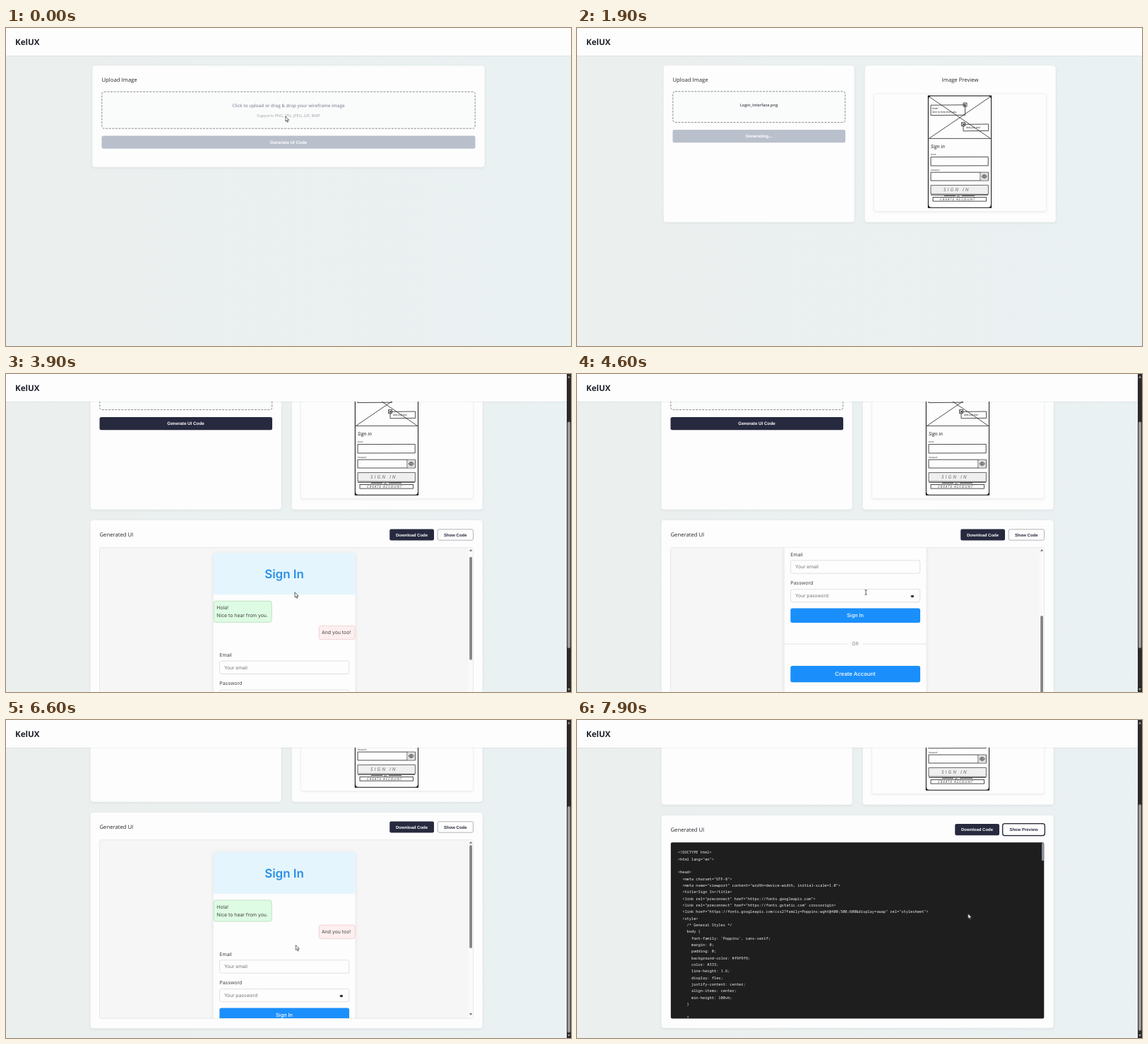
An HTML page that plays this animation: 800x450 px, repeating every 8 s.

```html
<!DOCTYPE html>
<html lang="en">
<head>
<meta charset="utf-8">
<title>KelUX</title>
<style>
@property --page { syntax: '<number>'; inherits: true; initial-value: 0; }
@property --panel { syntax: '<number>'; inherits: true; initial-value: 0; }

html, body { margin: 0; height: 100%; overflow: hidden; background: #ebf0f0; }
svg { display: block; }
#stage {
  width: 100vw; height: 100vh;
  animation: page-scroll 8s ease-in-out infinite, panel-scroll 8s ease-in-out infinite;
}
text { font-family: 'Open Sans', 'Noto Sans', sans-serif; text-rendering: geometricPrecision; fill: #25272e; }
.mid { text-anchor: middle; }
.brand { font-size: 11.6px; font-weight: 700; fill: #20222b; }
.head { font-size: 7.7px; font-weight: 500; }
.btn { font: 700 6.25px 'Liberation Sans', Arial, sans-serif; text-anchor: middle; fill: #fff; }
.small { font-size: 5.97px; }
.pop, .pop text { font-family: Inter, 'Open Sans', sans-serif; }
.label { font-size: 6.9px; fill: #444; }
.hint { font: 6.67px 'Liberation Sans', Arial, sans-serif; fill: #757575; }
.card { fill: #fdfdfd; stroke: #e4e8e9; stroke-width: .6; filter: drop-shadow(0 1px 1.5px rgba(0,0,0,.06)); }
.drop { fill: #fafbfb; stroke: #83868f; stroke-width: .95; stroke-dasharray: 3 1.6; }
.dark { fill: #272a3f; }
.grey { fill: #b9c0cb; }
.field { fill: #fdfdfd; stroke: #dadada; stroke-width: .8; }
.blue { fill: #1a8ffb; }
.rule { stroke: #dcdcdc; stroke-width: .8; }
.ink { fill: none; stroke: #222; stroke-width: .8; }
.hand-text text { font-style: italic; fill: #111; font-size: 3.6px; }
pre {
  margin: 0; color: #f2f2f2; white-space: pre;
  font: 5.33px/9.33px 'Noto Sans Mono', 'DejaVu Sans Mono', monospace;
}

#page { transform: translateY(calc(var(--page) * -1px)); }
#form { transform: translateY(calc(var(--panel) * -1px)); }
#page-thumb { transform: translateY(calc(var(--page) * .717px)); }
#panel-thumb { transform: translateY(calc(var(--panel) * .585px)); }

@keyframes page-scroll {
  0%, 42.5% { --page: 0; }
  47.5%, 57.6% { --page: 83; }
  61.2%, 83% { --page: 159; }
  90%, 94.4% { --page: 34; }
  98.6%, 100% { --page: 155; }
}
@keyframes panel-scroll {
  0%, 48% { --panel: 0; }
  51.2%, 53% { --panel: 83; }
  56.4%, 71.25% { --panel: 152; animation-timing-function: linear; }
  72.5% { --panel: 131; animation-timing-function: ease-out; }
  82.5%, 100% { --panel: 0; }
}

.start, .pair, .result, .busy, .ready, .preview, .code, .hover, .arrow, .hand, .beam {
  animation: 8s step-end infinite;
}
.start { animation-name: start; }
.pair { animation-name: pair; }
.result { animation-name: result; }
.busy { animation-name: busy; }
.ready { animation-name: ready; }
.preview { animation-name: preview; }
.code { animation-name: code; }
.hover { animation-name: hover; }
.arrow { animation-name: arrow; }
.hand { animation-name: hand; }
.beam { animation-name: beam; }
.shift { animation: shift 8s step-end infinite; }
.run { animation: run 8s linear infinite; }
#cursor { animation: move 8s ease-in-out infinite; }

@keyframes start { 0% { opacity: 1; } 3.7%, 100% { opacity: 0; } }
@keyframes pair { 0% { opacity: 0; } 3.7%, 100% { opacity: 1; } }
@keyframes result { 0% { opacity: 0; } 32.4%, 100% { opacity: 1; } }
@keyframes busy { 0% { opacity: 0; } 12.4% { opacity: 1; } 32.4%, 100% { opacity: 0; } }
@keyframes ready { 0% { opacity: 1; } 12.4% { opacity: 0; } 32.4%, 100% { opacity: 1; } }
@keyframes preview { 0% { opacity: 1; } 93.7%, 100% { opacity: 0; } }
@keyframes code { 0% { opacity: 0; } 93.7%, 100% { opacity: 1; } }
@keyframes hover { 0% { opacity: 0; } 90%, 100% { opacity: 1; } }
@keyframes shift { 0% { transform: translateX(3px); } 32.4%, 100% { transform: none; } }
@keyframes run {
  0%, 3.7% { fill: #b9c0cb; }
  6.25%, 12.4% { fill: #272a3f; }
  15%, 32.4% { fill: #b9c0cb; }
  35%, 100% { fill: #272a3f; }
}
@keyframes move {
  0%, 3.75% { transform: translate(395.5px, 125px); }
  10%, 13.1% { transform: translate(272px, 151px); }
  17.5%, 30% { transform: translate(6px, 263px); }
  37.4% { transform: translate(60px, 262px); }
  41.25%, 42.5% { transform: translate(416.3px, 257px); }
  47.5%, 63.8% { transform: translate(409px, 309px); }
  66.25%, 86% { transform: translate(410.3px, 318.5px); }
  90.5%, 94.3% { transform: translate(648px, 278px); }
  97.5%, 100% { transform: translate(553.6px, 274px); }
}
@keyframes arrow {
  0% { opacity: 1; } 8.75% { opacity: 0; } 13.1% { opacity: 1; } 23.7% { opacity: 0; }
  37.4% { opacity: 1; } 55.6% { opacity: 0; } 58.7% { opacity: 1; }
  90% { opacity: 0; } 94.4%, 100% { opacity: 1; }
}
@keyframes hand {
  0% { opacity: 0; } 8.75% { opacity: 1; } 13.1% { opacity: 0; }
  90% { opacity: 1; } 94.4%, 100% { opacity: 0; }
}
@keyframes beam { 0% { opacity: 0; } 55.6% { opacity: 1; } 58.7%, 100% { opacity: 0; } }
</style>
</head>
<body>
<svg id="stage" viewBox="0 0 800 450">
  <defs>
    <linearGradient id="bg"><stop stop-color="#ebefee"/><stop offset="1" stop-color="#eaf1f2"/></linearGradient>
    <clipPath id="panel-clip"><rect x="132.8" y="329" width="528.4" height="252" rx="2"/></clipPath>
  </defs>
  <rect width="800" height="450" fill="url(#bg)"/>

  <g id="page">
    <g class="start">
      <rect class="card" x="122" y="53" width="556" height="144" rx="4"/>
      <text class="head" x="135.5" y="76.2">Upload Image</text>
      <rect class="drop" x="135.8" y="90.2" width="528.4" height="52" rx="3"/>
      <text class="mid" x="400" y="111.6" style="font-size:6.3px;font-weight:600;fill:#8e91a2">Click to upload or drag &amp; drop your wireframe image</text>
      <text class="mid" x="400" y="125.5" style="font-size:5.6px;fill:#a0a2aa">Supports PNG, JPG, JPEG, GIF, BMP</text>
      <rect class="grey" x="135.5" y="152.5" width="529" height="18.3" rx="2.5"/>
      <text class="btn" x="400" y="164">Generate UI Code</text>
    </g>

    <g class="pair"><g class="shift">
      <rect class="card" x="119.3" y="52.8" width="270.7" height="222.2" rx="4"/>
      <text class="head" x="132.5" y="76">Upload Image</text>
      <rect class="drop" x="132.8" y="89.8" width="243.9" height="43.8" rx="3"/>
      <text class="mid" x="254.5" y="110.6" style="font-size:5.65px;font-weight:600;fill:#454750">Login_Interface.png</text>
      <rect class="run" x="132.5" y="144" width="244.5" height="18.2" rx="2.5"/>
      <text class="btn ready" x="254.5" y="155.2">Generate UI Code</text>
      <text class="btn busy" x="254.5" y="155.4">Generating...</text>

      <rect class="card" x="404.3" y="52.8" width="270.7" height="222.2" rx="4"/>
      <text class="head mid" x="539.5" y="76">Image Preview</text>
      <rect class="card" x="417.6" y="93" width="244" height="166.5" rx="2.5"/>

      <g class="hand-text">
        <rect x="493.8" y="95.5" width="90.2" height="159.2" fill="#000"/>
        <rect x="494.8" y="96.5" width="88.3" height="157.3" rx="4" fill="#fdfdfd"/>
        <path class="ink" d="M495 156.4H583M496 97.5L582 156M582 97.5L496 156"/>
        <path class="ink" d="M498 109.2L546.5 108.8V123.2L498 123.6ZM544 106h5v5.2h-5zM545 107l3 3m0-3l-3 3"/>
        <path class="ink" d="M544 136.4L579.6 136V145.4L544 145.8ZM541.5 133.6h5v5.2h-5zM542.5 134.6l3 3m0-3l-3 3"/>
        <text x="500" y="114.8">Hola!</text>
        <text x="500" y="120">Nice to hear from you.</text>
        <text x="548" y="142">And you too!</text>
        <text x="498" y="169.8" style="font-size:6.8px;font-weight:500">Sign in</text>
        <text x="498" y="180.3" style="font-size:2.9px">Email</text>
        <text x="498" y="201.6" style="font-size:2.9px">Password</text>
        <path class="ink" d="M498 182.6L579.2 182.4V194.8L498 195ZM498 204.2H579.4V216H498ZM568 204.2V216"/>
        <rect x="568.5" y="204.7" width="10.4" height="10.8" fill="#ddd"/>
        <path class="ink" stroke-width=".6" d="M570 210q3.6-4.6 7.4 0q-3.6 4.6-7.4 0"/>
        <circle class="ink" cx="573.7" cy="210" r="1.3"/>
        <path d="M498 222.6L579.4 222.4V235.4L498 235Z" fill="#efefef" stroke="#444" stroke-width=".8"/>
        <text x="516" y="231" style="font-size:6.8px;letter-spacing:2.1px;fill:#666">SIGN IN</text>
        <path class="ink" stroke-width=".5" d="M517 237.4H533M542 237.4H560M498 236.4H579"/>
        <text x="535" y="238.6" style="font-size:2.8px">OR</text>
        <rect class="ink" x="501" y="239.5" width="75.6" height="5.6"/>
        <text x="511" y="244.2" style="font-size:4.7px;letter-spacing:1px;fill:#333">CREATE ACCOUNT</text>
      </g>
    </g></g>

    <g class="result">
      <g class="preview">
        <rect class="card" x="119.3" y="289.5" width="555.7" height="306" rx="4"/>
        <text class="head" x="132.5" y="313.4">Generated UI</text>
        <rect class="dark" x="543.2" y="302.4" width="62.8" height="16.2" rx="2.3"/>
        <text class="btn small" x="574.5" y="312.6">Download Code</text>
        <rect x="611.2" y="302.8" width="50.3" height="15.4" rx="2.3" fill="#fdfdfd" stroke="#a0a2a8" stroke-width=".8"/>
        <rect class="hover" x="611.2" y="302.8" width="50.3" height="15.4" rx="2.3" fill="#eff1f4" stroke="#666a76" stroke-width=".8"/>
        <text class="btn small" x="636.3" y="312.6" style="fill:#272a3f">Show Code</text>

        <rect x="132.5" y="328.7" width="529" height="252.6" rx="2.5" fill="#f6f6f6" stroke="#e0e2e5" stroke-width=".8"/>
        <g clip-path="url(#panel-clip)">
          <g id="form" class="pop">
            <rect x="293.8" y="346" width="200.7" height="371" rx="3" fill="#fdfdfd" style="filter:drop-shadow(0 1px 2.5px rgba(0,0,0,.1))"/>
            <path d="M293.8 405V349q0-3 3-3H491.500q3 0 3 3V405Z" fill="#e4f5fe"/>
            <text class="mid" x="394" y="381.500" style="font-size:16.9px;font-weight:600;fill:#2b8fe2">Sign In</text>
            <rect x="294.2" y="414" width="82" height="30" rx="3" fill="#defbe3" stroke="#b4dcba" stroke-width=".8"/>
            <text class="label" x="298.300" y="426">Hola!</text>
            <text class="label" x="298.300" y="436.800">Nice to hear from you.</text>
            <rect x="443.200" y="449" width="51" height="19.400" rx="3" fill="#fdefef" stroke="#efcccf" stroke-width=".8"/>
            <text class="label" x="447" y="460.800">And you too!</text>

            <text class="label" x="302.300" y="492.600">Email</text>
            <rect class="field" x="302.500" y="498.800" width="183.200" height="18.400" rx="2.800"/>
            <text class="hint" x="309" y="510.300">Your email</text>
            <text class="label" x="302.300" y="533">Password</text>
            <rect class="field" x="302.500" y="539.600" width="183.200" height="18.200" rx="2.800"/>
            <text class="hint" x="309" y="551">Your password</text>
            <ellipse cx="474.800" cy="549.500" rx="2.200" ry="1.700" fill="#222"/>
            <circle cx="474.300" cy="549" r=".6" fill="#ddd"/>
            <rect class="blue" x="302.300" y="566.500" width="183.700" height="20.500" rx="2.800"/>
            <text class="mid" x="394" y="579.300" style="font-size:7.3px;font-weight:500;fill:#fff">Sign In</text>
            <path class="rule" d="M293.800 617H383M405 617H494.500"/>
            <text class="mid" x="394" y="619.400" style="font-size:6.7px;fill:#888">OR</text>
            <rect class="blue" x="302.300" y="648" width="183.700" height="23.200" rx="2.800"/>
            <text class="mid" x="394" y="662.300" style="font-size:7.7px;font-weight:500;fill:#fff">Create Account</text>
            <path class="rule" d="M293.800 688.500H494.500"/>
            <text class="mid" x="394" y="703.500" style="font-size:5.7px;fill:#777">© 2024 Our Hub. All rights reserved.</text>
          </g>
          <rect x="655" y="329" width="6.500" height="252" fill="#fafafa"/>
          <path d="M656 333.800l2.100-3 2.100 3zM656 574l2.100 3 2.100-3z" fill="#777"/>
          <rect id="panel-thumb" x="656.200" y="336" width="3.800" height="146" rx="1.900" fill="#858585"/>
        </g>
      </g>

      <g class="code">
        <rect class="card" x="119.300" y="289.500" width="555.700" height="301.500" rx="4"/>
        <text class="head" x="132.500" y="313.400">Generated UI</text>
        <rect class="dark" x="535.200" y="302" width="62.800" height="16.200" rx="2.300"/>
        <text class="btn small" x="566.500" y="312.300">Download Code</text>
        <rect x="602.600" y="301.600" width="59.800" height="17" rx="3" fill="#fdfdfd" stroke="#20222d" stroke-width="1.300"/>
        <rect x="604" y="303" width="57" height="14.200" rx="2" fill="none" stroke="#c4c6cc" stroke-width=".5"/>
        <text class="btn small" x="632.500" y="312.300" style="fill:#272a3f">Show Preview</text>
        <rect x="132.800" y="328.300" width="528.500" height="249.300" rx="2" fill="#1e1e1f"/>
        <rect x="658" y="329" width="3" height="25" rx=".5" fill="#8d8f9c"/>
        <foreignObject x="142.800" y="338.300" width="510" height="238">
<pre>&lt;!DOCTYPE html>
&lt;html lang="en">

&lt;head>
  &lt;meta charset="UTF-8">
  &lt;meta name="viewport" content="width=device-width, initial-scale=1.0">
  &lt;title>Sign In&lt;/title>
  &lt;link rel="preconnect" href="https://fonts.googleapis.com">
  &lt;link rel="preconnect" href="https://fonts.gstatic.com" crossorigin>
  &lt;link href="https://fonts.googleapis.com/css2?family=Poppins:wght@400;500;600&amp;display=swap" rel="stylesheet">
  &lt;style>
    /* General Styles */
    body {
      font-family: 'Poppins', sans-serif;
      margin: 0;
      padding: 0;
      background-color: #f9f9f9;
      color: #333;
      line-height: 1.6;
      display: flex;
      justify-content: center;
      align-items: center;
      min-height: 100vh;
    }

    *,</pre>
        </foreignObject>
      </g>
    </g>
  </g>

  <rect width="800" height="39" fill="#fdfdfd" style="filter:drop-shadow(0 .5px .8px rgba(0,0,0,.12))"/>
  <text class="brand" x="13" y="24">KelUX</text>

  <g class="result">
    <rect x="794" width="6" height="450" fill="#2b2b2c"/>
    <path d="M795 5.500l2-3 2 3zM795 445l2 3 2-3z" fill="#9d9d9d"/>
    <rect id="page-thumb" x="795" y="8" width="4" height="320.500" rx="2" fill="#9b9b9b"/>
  </g>

  <g id="cursor" stroke-linejoin="round">
    <path class="arrow" d="M0 0V7.200L1.700 5.700 2.900 8.300 4 7.800 2.800 5.200H5.100Z" fill="#fff" stroke="#222" stroke-width=".7"/>
    <path class="hand" d="M-.9 .8Q0-.6 .9 .8V3.600L3.800 4.300Q4.600 4.600 4.500 5.500L3.900 9.200H-.4L-2.600 6Q-2.500 4.900-.9 5.900Z" fill="#fff" stroke="#222" stroke-width=".7"/>
    <path class="beam" d="M-1.500-3.400Q0-3.400 0-2.600Q0-3.400 1.500-3.400M0-2.800V2.800M-1.500 3.400Q0 3.400 0 2.600Q0 3.400 1.500 3.400" fill="none" stroke="#333" stroke-width=".8"/>
  </g>
</svg>
</body>
</html>
```
